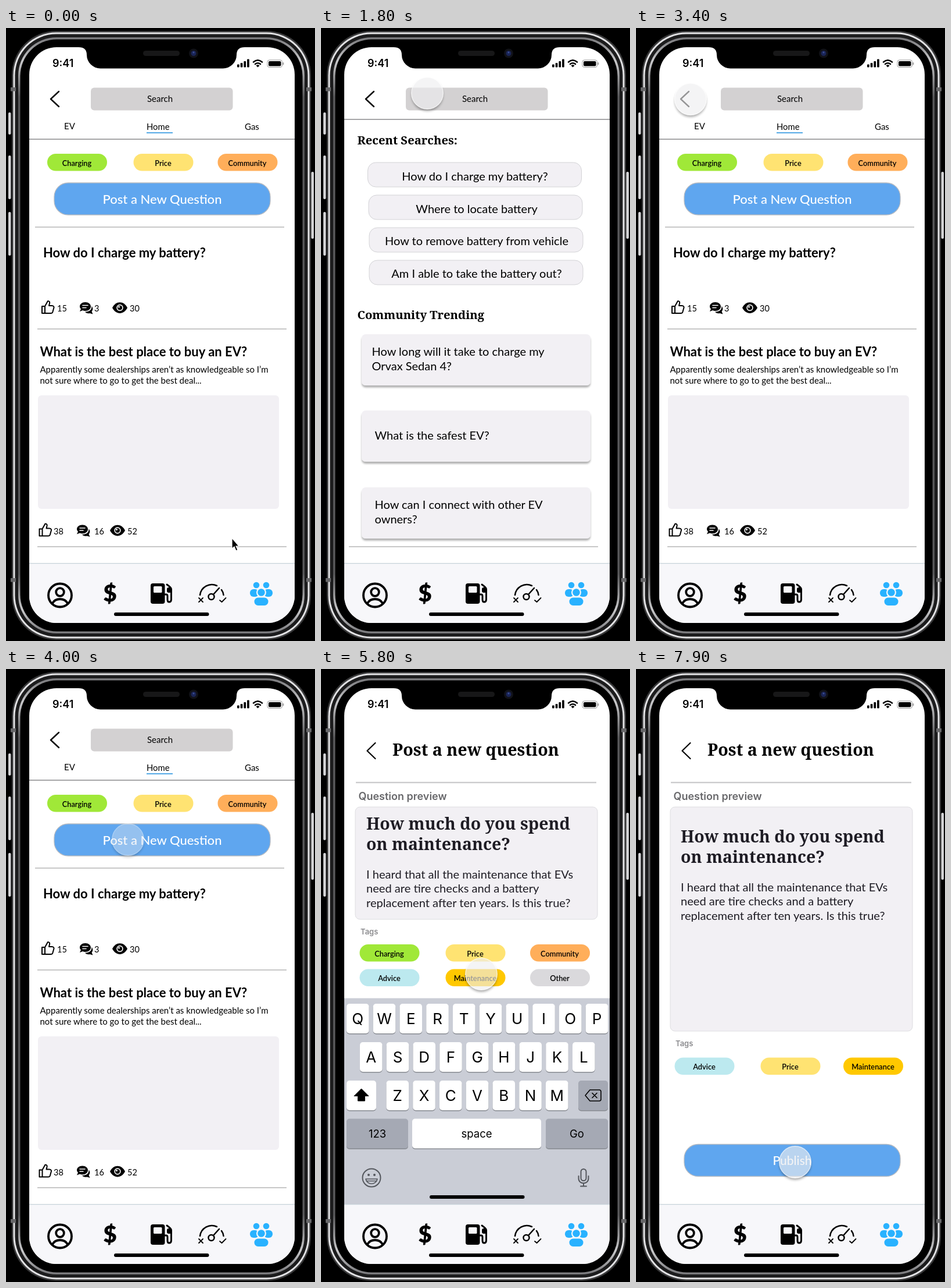
Write an HTML page that moves like this. It is 532 px wide and 1053 px high and loops after 8000 ms.

```html
<!DOCTYPE html>
<html lang="en">
<head>
<meta charset="utf-8">
<title>EV community prototype</title>
<style>
html, body { margin: 0; width: 100%; height: 100%; overflow: hidden; background: #000; }
svg { display: block; width: 532px; height: 1053px; }
text { font-family: Lato, "Open Sans", sans-serif; white-space: pre; }
.serif { font-family: "Noto Serif", serif; font-weight: 700; }
.ui { font-family: Inter, Roboto, sans-serif; }
</style>
</head>
<body>
<svg id="stage" viewBox="0 0 532 1053"></svg>
<script>
const LOOP = 8000, PALE = '#f2f0f4', BLUE = '#5fa6ef', SKY = '#29b2ff';
const LIME = '#a0e838', LEMON = '#ffe372', PEACH = '#ffae5a';

// Drawing helpers
const text = (x, y, s, size, extra = '') => `<text x="${x}" y="${y}" font-size="${size}" ${extra}>${s}</text>`;
const mid = (x, y, s, size, extra = '') => text(x, y, s, size, 'text-anchor="middle" ' + extra);
const lines = (x, y, step, list, size, extra) => list.map((s, i) => text(x, y + i * step, s, size, extra)).join('');
const rect = (x, y, w, h, r, fill, extra = '') => `<rect x="${x}" y="${y}" width="${w}" height="${h}" rx="${r}" fill="${fill}" ${extra}/>`;
const circle = (x, y, r, fill, extra = '') => `<circle cx="${x}" cy="${y}" r="${r}" fill="${fill}" ${extra}/>`;
const path = (d, extra = '') => `<path d="${d}" ${extra}/>`;
const stroke = (d, w = 2, color = '#000') =>
  path(d, `fill="none" stroke="${color}" stroke-width="${w}" stroke-linecap="round" stroke-linejoin="round"`);
const rule = (x1, x2, y) => rect(x1, y - 1, x2 - x1, 2, 0, '#c8c8c8');
const at = (x, y, s) => `<g transform="translate(${x} ${y})">${s}</g>`;
const group = (id, s) => `<g id="${id}">${s}</g>`;

const pill = (x, y, s, fill) => rect(x, y, 103, 29.5, 14.7, fill) + mid(x + 51, y + 20.5, s, 12.8, 'font-weight="600"');
const button = (y, s, size) => rect(83, y, 372, 55, 24, BLUE, 'stroke="#b4bac2" stroke-width="1.3"') +
  mid(269, y + 35.5, s, size, 'fill="#fff" font-weight="500"');

const thumb = stroke('M1 10h5v12H1zM6 10l5-9c3 0 3.500 2 3 4l-1 4h5c3 0 4 2 3.300 4l-2 7c-.5 1.500-1 2-3 2H6', 2);
const chat = path('M9.500 0C15 0 19 3.300 19 7.500S15 15 9.500 15Q7 15 5 14L0 16l2-4.500Q0 10 0 7.500C0 3.300 4 0 9.500 0z') +
  path('M20.500 7c2 2 3 6 0 9l2 4.500-5-1.500c-4 1-7-.5-8.500-2.500C16 17 21 13 20.500 7z') + stroke('M5 5.500h9M5 9.500h6', 1.6, '#fff');
const eye = path('M0 9.500C6-3 20-3 26 9.500C20 22 6 22 0 9.500z') + circle(13, 9.500, 5.700, '#fff') +
  circle(13, 9.500, 4, '#000') + circle(11.500, 8, 1.500, '#fff');
const stats = (y, xs, nx, counts) =>
  [thumb, chat, eye].map((icon, i) => at(xs[i], y + (i ? 3 : 0), icon) + text(nx[i], y + 19, counts[i], 14.500)).join('');

const searchBar = stroke('M91 109L77 122L91 135', 2.4) + rect(146, 102.500, 244.500, 39, 6, '#d3d1d2') + mid(265, 126.500, 'Search', 15);

const home = searchBar + text(100, 174, 'EV', 15) + text(242, 175, 'Home', 14.800) + text(411, 175, 'Gas', 15) +
  rect(242, 179, 45, 2, 0, '#55aae6') +
  pill(71, 216, 'Charging', LIME) + pill(219.500, 216, 'Price', LEMON) + pill(364.500, 216, 'Community', PEACH) +
  button(266, 'Post a New Question', 22) + rule(50, 479, 342) +
  text(64, 394, 'How do I charge my battery?', 22, 'font-weight="700"') +
  stats(468, [61, 127, 183], [88, 152, 213], [15, 3, 30]) + rule(54, 483, 517) +
  text(58.500, 564, 'What is the best place to buy an EV?', 22, 'font-weight="700"') +
  lines(58.500, 592, 18.500, ['Apparently some dealerships aren’t as knowledgeable so I’m', 'not sure where to go to get the best deal...'], 15) +
  rect(55, 631, 415, 195, 6, PALE) + stats(850.500, [56.500, 122, 179], [82, 152, 209], [38, 16, 52]) + rule(54, 483, 891);

const recent = ['How do I charge my battery?', 'Where to locate battery', 'How to remove battery from vehicle', 'Am I able to take the battery out?'];
const card = y => rect(70, y, 394, 88, 7, PALE, 'filter="url(#drop)"');
const search = searchBar + text(62.500, 200, 'Recent Searches:', 20.200, 'class="serif"') +
  recent.map((s, i) => rect([80.500, 82, 83, 83][i], 231 + i * 56, 368, 42, 14, PALE, 'stroke="#d3d3d6"') +
    mid(i ? 268 : 265, 262 + i * 55.700, s, 20)).join('') +
  text(62.500, 499.500, 'Community Trending', 20.200, 'class="serif"') +
  card(526) + card(657) + card(789) +
  lines(87.500, 563, 24.500, ['How long will it take to charge my', 'Orvax Sedan 4?'], 20) +
  text(92.500, 706.500, 'What is the safest EV?', 20) +
  lines(92.500, 826, 24.500, ['How can I connect with other EV', 'owners?'], 20) + rule(48, 477, 891);

// Shared by both composing screens
const preview = (height, x, y) => stroke('M93.500 127L79.500 140.500L93.500 154', 2.2) +
  text(123, 148.500, 'Post a new question', 28.600, 'class="serif"') +
  rect(60, 193.800, 414, 2.400, 0, '#cbcbcd') +
  text(64.500, 225, 'Question preview', 18, 'class="ui" font-weight="600" fill="#68686b"') +
  rect(59, 237, 417, height, 8, PALE, 'stroke="#dddde0"') +
  lines(x, y, 35.800, ['How much do you spend', 'on maintenance?'], 28.500, 'class="serif" fill="#1e1c24"') +
  lines(x, y + 84, 24.500, ['I heard that all the maintenance that EVs', 'need are tire checks and a battery', 'replacement after ten years. Is this true?'], 20.100, 'fill="#1e1c24"') +
  text(68, 237 + height + 26, 'Tags', 13, 'class="ui" font-weight="600" fill="#8b8b8e"');

const key = (x, y, w, label = '', size = 26, fill = '#fff') => rect(x, y + 1.500, w, 51, 5, '#888b92') + rect(x, y, w, 51, 5, fill) +
  mid(x + w / 2, y + 25.500 + size * 0.36, label, size, 'class="ui"');
const keyRow = (x, y, letters) => [...letters].map((c, i) => key(x + i * 45.750, y, 38.500, c)).join('');
const GREY = '#a5a9b4';
const keyboard = rect(40, 565.500, 457, 354, 0, '#cacdd6') +
  keyRow(44, 575, 'QWERTYUIOP') + keyRow(67, 641, 'ASDFGHJKL') + keyRow(112.500, 707, 'ZXCVBNM') +
  key(44, 707, 51) + path('M69.500 721L82 733.500H75.500V742H63.500V733.500H57z', 'stroke="#000" stroke-linejoin="round"') +
  key(443, 707, 51, '', 1, GREY) + stroke('M463 723H479Q482 723 482 726V739Q482 742 479 742H463L455 732.500zM467 728.500l8 8m0-8l-8 8', 1.600) +
  key(44, 772.500, 106, '123', 18.500, GREY) + key(157, 772.500, 222, 'space', 18.500) + key(387, 772.500, 107, 'Go', 18.500, GREY) +
  at(87, 874, circle(0, 0, 15.500, 'none', 'stroke="#54575d" stroke-width="2"') + circle(-5, -5, 2, '#54575d') + circle(5, -5, 2, '#54575d') +
    stroke('M-10 2H10C8 13-8 13-10 2zM-8 5.500H8', 1.600, '#54575d')) +
  at(452, 874, rect(-4.500, -15, 9, 20, 4.500, 'none', 'stroke="#54575d" stroke-width="2"') +
    stroke('M-8.500-3V1C-8.500 12 8.500 12 8.500 1V-3M0 9.500V14.500M-5 14.500H5', 2, '#54575d')) +
  rect(187, 904, 163.500, 6, 3, '#000');

const compose = preview(193, 78, 275.500) +
  pill(66.500, 473, 'Charging', LIME) + pill(214.500, 473, 'Price', LEMON) + pill(360, 473, 'Community', PEACH) +
  pill(66.500, 515.500, 'Advice', '#bce9ef') + pill(214.500, 515.500, 'Maintenance', '#ffc800') + pill(360, 515.500, 'Other', '#dad9dc') + keyboard;

const publish = preview(385, 77, 297.500) +
  pill(66.500, 667.500, 'Advice', '#bce9ef') + pill(214.500, 667.500, 'Price', LEMON) + pill(357, 667.500, 'Maintenance', '#ffc800') +
  button(816.500, 'Publish', 21);

const people = circle(431, 957, 5.300, SKY) + circle(448, 957, 5.300, SKY) +
  rect(420, 964, 15, 13, 6, SKY) + rect(444, 964, 15, 13, 6, SKY) +
  circle(439.500, 969.500, 8.500, '#f7f7fa') + circle(439.500, 969.500, 6.300, SKY) + rect(427.500, 978.500, 24, 13.500, 6.500, SKY);
const tabs = rect(40, 919, 457, 110, 0, '#f7f7fa') + rect(40, 919, 457, 1.300, 0, '#c8d3da') +
  circle(93, 974.500, 20, 'none', 'stroke="#000" stroke-width="3.800"') + circle(93, 969, 6.800, 'none', 'stroke="#000" stroke-width="3.800"') +
  stroke('M80 988Q84 981 93 981T106 988', 3.800) +
  mid(179, 985, '$', 40, 'font-weight="900"') +
  rect(249, 954, 24.500, 35, 4, '#000') + rect(254, 959, 14.500, 11, 1.500, '#f7f7fa') +
  stroke('M273 973H276Q278 973 278 976V982Q278 986 281 986T284.500 982V964Q284.500 961 277 956', 3) + rect(277, 961, 8, 9, 3, '#000') +
  stroke('M334 974A20.500 20.500 0 0 1 363 958M371 965Q374 969 374.500 974M357 973L367 962', 2.500) +
  circle(353.500, 977, 5, 'none', 'stroke="#000" stroke-width="2.500"') +
  stroke('M332 979l7 7m0-7l-7 7M368 983l3.500 3 7-7', 1.800) +
  people + rect(186, 1004, 163.500, 6, 3, '#000');

const status = text(80, 67, '9:41', 18, 'class="ui" font-weight="600"') +
  [5, 7.500, 10.500, 14].map((h, i) => rect(398 + i * 5.700, 67.500 - h, 3.700, h, 1, '#000')).join('') +
  stroke('M426 58.500Q433.500 52 441 58.500M429 62Q433.500 58.500 438 62', 2.600) + path('M430.500 64.500Q433.500 62 436.500 64.500L433.500 67.500z') +
  rect(450, 55, 25.500, 12.500, 3.500, 'none', 'stroke="#999"') + rect(452, 57, 21.500, 8.500, 2, '#000') + rect(476.500, 59, 1.800, 4.500, 1, '#999');

const shell = (inset, r, fill) => rect(10 + inset, 5 + inset, 515 - 2 * inset, 1046 - 2 * inset, r, fill);
const side = (x, y, h) => rect(x, y, 4.500, h, 2, '#d4d4d6');
const body = side(4, 145, 38) + side(4, 219, 75) + side(4, 316, 75) + side(525.500, 247, 115) +
  shell(0, 76, '#3a3a3b') + shell(2.500, 74, '#e2e2e4') + shell(5.500, 71, '#1c1c1d') +
  shell(11, 66, 'url(#metal)') + shell(14.500, 63, '#000') +
  [102, 945].map(y => rect(8, y, 9, 6.500, 0, '#68686a') + rect(517, y, 9, 6.500, 0, '#68686a')).join('');

const notch = path('M125 31V33Q139 33 139 46A23.500 23.500 0 0 0 162.500 69.500H373.500A23.500 23.500 0 0 0 397 46Q397 33 411 33V31z') +
  rect(236, 39, 63, 9, 4.500, '#171718') + circle(323, 43.500, 8, '#111218') + circle(323, 43.500, 4.500, '#1a2456') + circle(323, 42, 1.500, '#3a4f95');

const stage = document.getElementById('stage');
stage.innerHTML = `<defs>
  <linearGradient id="metal" x2="0" y2="1"><stop stop-color="#77777a"/><stop offset=".04" stop-color="#c8c8ca"/><stop offset=".1" stop-color="#58585a"/>
    <stop offset=".9" stop-color="#58585a"/><stop offset=".96" stop-color="#c8c8ca"/><stop offset="1" stop-color="#77777a"/></linearGradient>
  <filter id="drop" x="-10%" y="-10%" width="120%" height="130%"><feDropShadow dx="0" dy="3.500" stdDeviation="1.800" flood-opacity=".3"/></filter>
  <filter id="soft" x="-50%" y="-50%" width="200%" height="200%"><feGaussianBlur stdDeviation="2.200"/></filter>
  <clipPath id="screen"><rect x="40" y="33" width="457" height="989" rx="47"/></clipPath>
  <mask id="outside"><rect x="-50" y="-50" width="100" height="100" fill="#fff"/><circle r="27.500"/></mask></defs>` +
  body + `<g clip-path="url(#screen)">` + rect(40, 33, 457, 989, 0, '#fff') +
  group('search', search) + group('home', home) + group('compose', compose) + group('publish', publish) +
  rect(40, 0, 457, 2, 0, '#a6a6a8', 'id="divider"') + tabs + status + notch + '</g>' +
  group('touch', `<g mask="url(#outside)">${circle(0, 3.500, 27, '#000', 'opacity=".35" filter="url(#soft)"')}</g>` +
    circle(0, 0, 27.300, '#eeeeef', 'fill-opacity=".64" stroke="#fff" stroke-opacity=".65" stroke-width="1.500"')) +
  path('M389 876V894.500L393 891L396 898L399 896.500L396 890H401z', 'id="arrow" stroke="#fff" stroke-width="1.200"');

const [homeEl, searchEl, composeEl, publishEl, divider, touch, arrow] =
  ['home', 'search', 'compose', 'publish', 'divider', 'touch', 'arrow'].map(id => document.getElementById(id));

// Time, x, y, opacity
const touches = [
  [100, 389, 878, .8], [850, 183, 112, 1], [1850, 183, 112, 1], [2450, 91, 118, 1], [3350, 91, 118, 1],
  [3900, 210, 293, .6], [4900, 210, 293, .6], [5450, 276, 524, 1], [6000, 276, 524, 1], [6500, 276, 538, 1],
  [7250, 276, 538, 1], [7750, 274, 847, 1], [8000, 274, 847, 1]
];
const clamp = u => Math.min(1, Math.max(0, u));
const fade = (t, start) => 1 - (1 - clamp((t - start) / 300)) ** 2;

function touchAt(t) {
  const i = Math.max(1, touches.findIndex(k => k[0] > t));
  const a = touches[i - 1], b = touches[i];
  const u = clamp((t - a[0]) / (b[0] - a[0])), e = u * u * (3 - 2 * u);
  return a.map((v, j) => v + (b[j] - v) * e);
}

function draw(now) {
  const t = now % LOOP;
  const toSearch = fade(t, 920), back = fade(t, 2867), toCompose = fade(t, 4550), toPublish = fade(t, 6080);
  const onSearch = toSearch - back;
  homeEl.setAttribute('opacity', 1 - onSearch - toCompose);
  searchEl.setAttribute('opacity', onSearch);
  composeEl.setAttribute('opacity', toCompose - toPublish);
  publishEl.setAttribute('opacity', toPublish);
  divider.setAttribute('y', 190 - 34 * onSearch);
  divider.setAttribute('opacity', 1 - toCompose);
  const [, x, y, opacity] = touchAt(t);
  touch.setAttribute('transform', `translate(${x} ${y})`);
  touch.setAttribute('opacity', t < 100 ? 0 : opacity);
  arrow.setAttribute('opacity', t < 100 ? 1 : 0);
  requestAnimationFrame(() => draw(performance.now()));
}
draw(performance.now());
</script>
</body>
</html>
```
